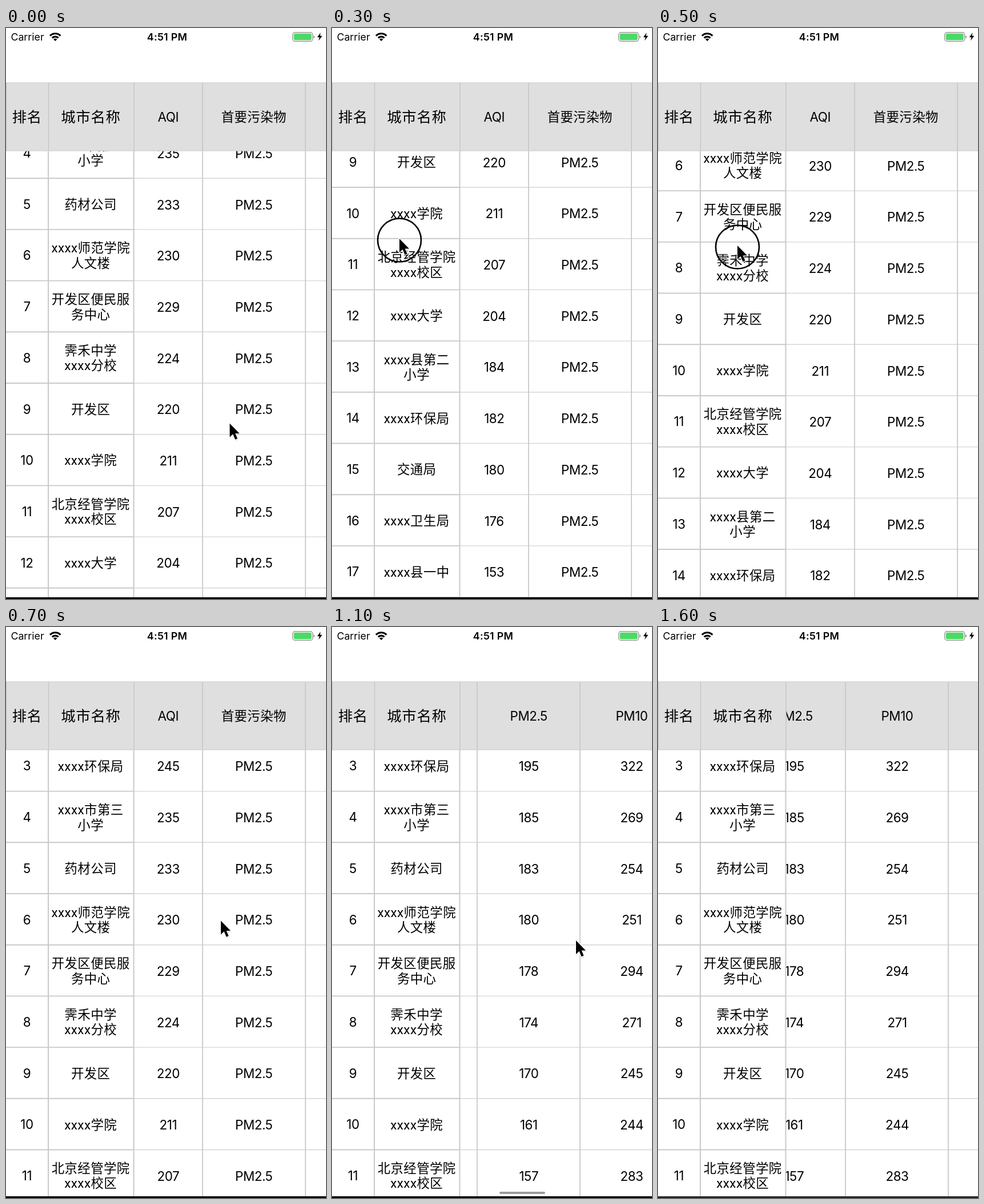
An HTML page that plays this animation: 560 by 1000 pixels, repeating every 2 s.

```html
<!DOCTYPE html>
<html lang="zh">
<head>
<meta charset="utf-8">
<title>AQI</title>
<style>
  html, body { margin: 0; width: 100%; height: 100%; overflow: hidden; background: #fff; }
  #stage { display: block; width: 560px; height: 1000px; }
  text { font: 22.4px Inter, "Noto Sans CJK SC", "Noto Sans CJK", sans-serif; fill: #000; }
  .mid text { text-anchor: middle; }
  text.num { letter-spacing: -.45px; }
  text.zh { font-family: Roboto, "Noto Sans CJK SC", "Noto Sans CJK", sans-serif; letter-spacing: .45px; }
  text.big { font-size: 25.4px; letter-spacing: .7px; }
  text.bar { font-size: 17.8px; }
</style>
</head>
<body>
<svg id="stage" viewBox="0 0 560 1000">
  <rect width="560" height="1000" fill="#fff"/>

  <text class="bar" x="8.4" y="21.6">Carrier</text>
  <g fill="none" stroke="#000" stroke-width="3.1">
    <path d="M77 13.6a13 13 0 0 1 18.4 0"/>
    <path d="M80.8 17.4a7.6 7.6 0 0 1 10.8 0"/>
  </g>
  <path d="M86.2 23l-3.2-3.3a4.6 4.6 0 0 1 6.4 0z"/>
  <text class="bar" x="282" y="21.8" text-anchor="middle" style="font-weight:600;letter-spacing:.3px">4:51 PM</text>
  <rect x="501.7" y="7.7" width="35" height="15.6" rx="4" fill="#fff" stroke="#999" stroke-width="1.4"/>
  <rect x="503.7" y="9.7" width="31" height="11.6" rx="2.2" fill="#4cd964"/>
  <path d="M538.2 13q2 .6 2 2.6t-2 2.6z" fill="#999"/>
  <path d="M550.6 8l-5.8 8.2h3.8l-1.6 6 6.4-8.4h-4z"/>

  <!-- scrolling body -->
  <svg class="mid" y="215" width="560" height="782" viewBox="0 215 560 782">
    <svg x="224" y="215" width="336" height="782" viewBox="224 215 336 782">
      <g id="cells"></g>
    </svg>
    <g id="names"></g>
    <path d="M74 215V997M223.5 215V997" stroke="#c9c9c9" stroke-width="2"/>
  </svg>

  <!-- fixed header -->
  <g class="mid">
    <rect y="95.5" width="560" height="120" fill="#dfdfdf"/>
    <svg x="224" y="96" width="336" height="120" viewBox="224 96 336 120">
      <g id="heads"></g>
    </svg>
    <path d="M0 96H560M0 215H560" stroke="#cfcfcf"/>
    <path d="M.5 96V215M74.5 96V215M224 96V215" stroke="#c4c4c4" stroke-width="1.3"/>
    <text class="zh big" x="36.8" y="165">排名</text>
    <text class="zh big" x="148.4" y="165">城市名称</text>
  </g>

  <rect id="thumb" y="989" width="80" height="4" rx="2" fill="#9a9a9a"/>
  <rect id="foot" y="997" width="560" height="3"/>

  <g id="pointer">
    <circle id="ring" cy="2.5" r="38" fill="none" stroke="#000" stroke-width="2.6"/>
    <path d="M0 2V27L6 21.5L10.3 31L14.5 29.2L10.4 20H18Z" fill="#000" opacity=".12"/>
    <path d="M0 0V24L5.6 18.8L9.6 28.2L13.6 26.5L9.7 17.4H17Z" stroke="#fff" stroke-width="2.4" paint-order="stroke"/>
  </g>
</svg>

<script>
const $ = id => document.getElementById(id);
const PITCH = 89.7, LOOP = 2000, FIRST = 3;

const rows = [
  ['xxxx环保局', 245, 195, 322],
  ['xxxx市第三|小学', 235, 185, 269],
  ['药材公司', 233, 183, 254],
  ['xxxx师范学院|人文楼', 230, 180, 251],
  ['开发区便民服|务中心', 229, 178, 294],
  ['霁禾中学|xxxx分校', 224, 174, 271],
  ['开发区', 220, 170, 245],
  ['xxxx学院', 211, 161, 244],
  ['北京经管学院|xxxx校区', 207, 157, 283],
  ['xxxx大学', 204],
  ['xxxx县第二|小学', 184],
  ['xxxx环保局', 182],
  ['交通局', 180],
  ['xxxx卫生局', 176],
  ['xxxx县一中', 153]
];

// time, vertical scroll, horizontal scroll, pointer x, pointer y, pressed
const steps = [
  [0, 310.75, 0, 391.5, 692.5, 0],
  [100, 450, 0, 300, 585, 0],
  [200, 640, 0, 209, 477, 0],
  [300, 743.45, 0, 118, 369, 1],
  [400, 610, 0, 128, 376, 1],
  [500, 468.2, 0, 139, 381, 1],
  [600, 196.65, 0, 78, 365, 1],
  [700, 196.65, 0, 376, 514.5, 0],
  [900, 196.65, 92, 268, 518.5, 0],
  [1000, 196.65, 185, 350, 534, 0],
  [1100, 196.65, 270, 427, 549, 0],
  [1200, 196.65, 345, 352, 551, 0],
  [1300, 196.65, 376, -100, 0, 0]
];

function add(parent, tag, attrs, content) {
  const el = document.createElementNS('http://www.w3.org/2000/svg', tag);
  for (const key in attrs) el.setAttribute(key, attrs[key]);
  if (content !== undefined) el.textContent = content;
  parent.appendChild(el);
  return el;
}
const label = (parent, cls, x, y, str) => add(parent, 'text', { class: cls, x, y }, str);
const line = (parent, d, stroke, width) => add(parent, 'path', { d, stroke, 'stroke-width': width });

const cells = $('cells'), names = $('names'), heads = $('heads');
add(names, 'rect', { width: 223.5, height: 2000, fill: '#fff' });

rows.forEach(([city, aqi, fine, coarse], i) => {
  const rank = i + FIRST;
  const y = 260 + (rank - 1) * PITCH;
  const edge = y + PITCH / 2;

  line(names, `M0 ${edge}H224`, '#c9c9c9', 1.9);
  label(names, 'num', 36.5, y + 8.7, rank);
  const parts = city.split('|');
  parts.forEach((part, k) =>
    label(names, 'zh', 148.2, y + 8.9 + (k - (parts.length - 1) / 2) * 26.4, part));

  line(cells, `M224 ${edge}H1100`, '#d6d6d6', 1.4);
  [[283.8, aqi], [433.8, 'PM2.5'], [614.3, fine], [794.5, coarse]].forEach(([x, value]) => {
    if (value) label(cells, 'num', x, y + 9.5, value);
  });
});

[344, 524, 704, 884].forEach(x => {
  line(cells, `M${x} 200V2000`, '#c9c9c9', 1.8);
  line(heads, `M${x} 96V215`, '#c4c4c4', 1.5);
});
[['num', 283.8, 'AQI'], ['zh', 433.8, '首要污染物'], ['num', 614.3, 'PM2.5'], ['num', 794.5, 'PM10']]
  .forEach(([cls, x, str]) => label(heads, cls, x, 164.4, str));

const move = (el, x, y) => el.setAttribute('transform', `translate(${x} ${y})`);
const show = (el, on) => el.setAttribute('visibility', on ? 'visible' : 'hidden');

function draw(t) {
  const [, top, left, px, py, pressed] = steps.findLast(s => s[0] <= t);
  move(cells, -left, -top);
  move(names, 0, -top);
  move(heads, -left, 0);
  move($('pointer'), px, py);
  show($('ring'), pressed);
  $('thumb').setAttribute('x', 227.8 + left * 0.2416);
  show($('thumb'), t >= 900 && t < 1300);
  $('foot').setAttribute('fill', t < 1600 ? '#000' : '#262626');
}

const start = performance.now();
function tick() {
  draw((performance.now() - start) % LOOP);
  requestAnimationFrame(tick);
}
tick();
</script>
</body>
</html>
```
